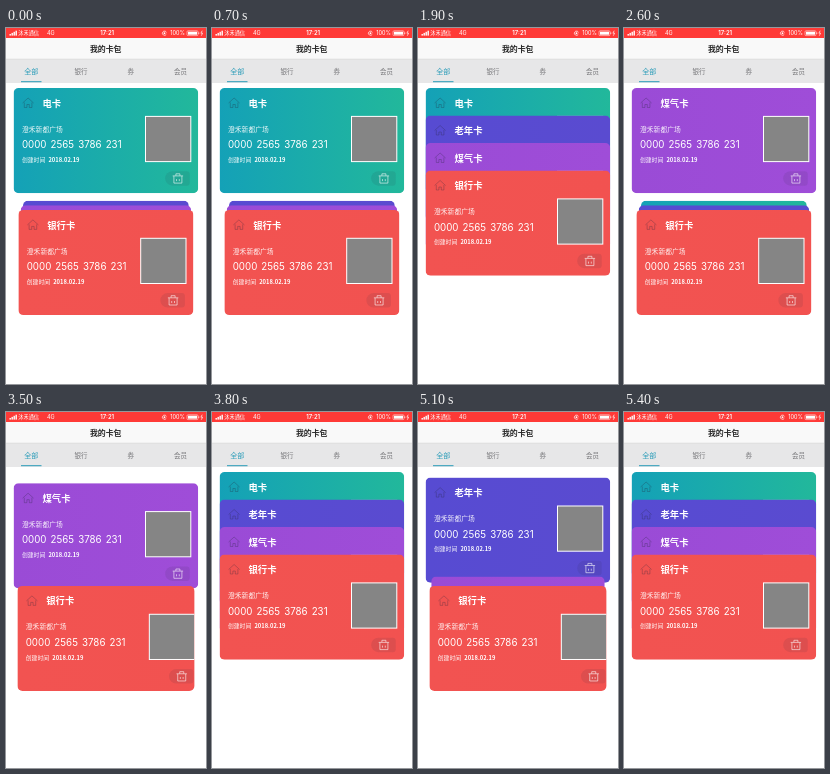
An HTML page with a canvas for the animation above (5.7 s loop, 200 by 356 pixels).

```html
<!DOCTYPE html>
<html lang="zh-CN">
<head>
<meta charset="utf-8">
<title>我的卡包</title>
<style>
html, body { margin: 0; width: 100%; height: 100%; overflow: hidden; background: #fff; }
canvas { display: block; width: 100vw; height: 100vh; }
</style>
</head>
<body>
<canvas id="stage"></canvas>
<script>
const W = 200, H = 356, LOOP = 5700, STEP = 100, DURATION = 400;
const CARD = { x: 7.6, y: 60, w: 184.6, h: 105.2, r: 5 };
const CJK = '"Noto Sans CJK SC", "Noto Sans CJK", sans-serif';
const LATIN = 'Inter, sans-serif';

const cards = [
  { title: '电卡', colors: ['#14a1b7', '#22b89b'] },
  { title: '老年卡', colors: ['#574bd2', '#5a4bd0'] },
  { title: '煤气卡', colors: ['#9a4bd6', '#9f4dd8'] },
  { title: '银行卡', colors: ['#f25351', '#f25250'] }
];

// open: index of the opened card, -1 for the plain list
const moves = [
  { at: 1600, open: -1, lead: 150 },
  { at: 2300, open: 2, lead: 100 },
  { at: 3500, open: -1, lead: 125 },
  { at: 4300, open: 1, lead: 86 },
  { at: 5100, open: -1, lead: 125 }
];

const canvas = document.getElementById('stage');
const ctx = canvas.getContext('2d');
const lerp = (a, b, p) => a + (b - a) * p;

// cubic-bezier(.42, 0, .58, 1)
function ease(x) {
  if (x >= 1) return 1;
  let lo = 0, hi = 1;
  for (let i = 0; i < 24; i++) {
    const u = (lo + hi) / 2, v = 1 - u;
    const bx = 3 * v * v * u * 0.42 + 3 * v * u * u * 0.58 + u * u * u;
    if (bx < x) lo = u; else hi = u;
  }
  return lo * lo * (3 - 2 * lo);
}

function slot(i, open) {
  if (open < 0) return { y: CARD.y + 27.5 * i, inset: 0 };
  if (i === open) return { y: CARD.y, inset: 0 };
  const rank = i > open ? i - 1 : i;
  return { y: 172.7 + 4.6 * rank, inset: 9.4 - 2.3 * rank };
}

function text(str, x, y, size, color, { weight = 400, align = 'left', font = CJK, gap = 0 } = {}) {
  ctx.font = `${weight} ${size}px ${font}`;
  ctx.wordSpacing = `${gap}px`;
  ctx.textAlign = align;
  ctx.textBaseline = 'alphabetic';
  ctx.fillStyle = color;
  ctx.fillText(str, x, y);
}

function rect(x, y, w, h, color) {
  ctx.fillStyle = color;
  ctx.fillRect(x, y, w, h);
}

function round(x, y, w, h, r) {
  ctx.beginPath();
  ctx.roundRect(x, y, w, h, r);
}

function path(points, color, width) {
  ctx.beginPath();
  points.forEach(([x, y], i) => i ? ctx.lineTo(x, y) : ctx.moveTo(x, y));
  ctx.strokeStyle = color;
  ctx.lineWidth = width;
  ctx.stroke();
}

function homeIcon(x, y) {
  const c = 'rgba(40,40,60,.3)';
  path([[x - 5.5, y], [x, y - 5], [x + 5.5, y]], c, 0.9);
  path([[x - 3.8, y - 0.5], [x - 3.8, y + 4.5], [x - 1.2, y + 4.5], [x - 1.2, y + 1.5],
        [x + 1.2, y + 1.5], [x + 1.2, y + 4.5], [x + 3.8, y + 4.5], [x + 3.8, y - 0.5]], c, 0.9);
}

function trashIcon(x, y) {
  const c = 'rgba(255,255,255,.72)';
  path([[x - 5.2, y - 2.6], [x + 5.2, y - 2.6]], c, 0.8);
  path([[x - 2, y - 2.8], [x - 2, y - 4.7], [x + 2, y - 4.7], [x + 2, y - 2.8]], c, 0.8);
  path([[x - 4, y - 2.4], [x - 4, y + 4.6], [x + 4, y + 4.6], [x + 4, y - 2.4]], c, 0.8);
  path([[x - 1.4, y + 0.6], [x - 1.4, y + 2.6]], c, 0.8);
  path([[x + 1.4, y + 0.6], [x + 1.4, y + 2.6]], c, 0.8);
}

function drawCard(card, x, y, clipW, w) {
  ctx.save();
  ctx.translate(x, y);
  round(0, 0, clipW, CARD.h, CARD.r);
  ctx.clip();

  const fill = ctx.createLinearGradient(0, 0, w, 0);
  card.colors.forEach((c, i) => fill.addColorStop(i, c));
  rect(0, 0, w, CARD.h, fill);

  homeIcon(14.5, 15);
  text(card.title, 28.8, 18.6, 9.4, '#fff', { weight: 700 });
  text('澄禾新都广场', 8.4, 43.6, 6.8, 'rgba(255,255,255,.92)', { weight: 500 });
  text('0000 2565 3786 231', 8.3, 60.2, 9.75, '#fff', { font: LATIN, gap: 1.3 });
  text('创建时间', 8.4, 73.7, 5.8, '#fff', { weight: 500 });
  text('2018.02.19', 34.8, 73.7, 5.8, '#fff', { weight: 600, font: CJK });

  // plain tile
  rect(w - 53.2, 27.9, 46.3, 46.2, '#fff');
  rect(w - 52.2, 28.9, 44.3, 44.2, '#858585');

  round(w - 33, 83.2, 24.5, 14.5, [7.2, 3, 3, 7.2]);
  ctx.fillStyle = 'rgba(40,40,60,.1)';
  ctx.fill();
  trashIcon(w - 20.3, 90.5);
  ctx.restore();
}

function drawStatusBar() {
  rect(0, 0, W, 10, '#ff3a37');
  for (let i = 0; i < 4; i++) rect(3.5 + i * 2, 6 - i * 1.1, 1.4, 1.6 + i * 1.1, '#fff');
  text('沐禾通信', 12.3, 7.2, 5.2, '#fff');
  text('4G', 41, 7.2, 5.6, '#fff', { font: LATIN });
  text('17:21', 101.2, 7.3, 5.9, '#fff', { weight: 600, align: 'center', font: LATIN });

  ctx.strokeStyle = '#fff';
  ctx.lineWidth = 0.7;
  ctx.beginPath();
  ctx.arc(158.5, 5.2, 2.1, 0.5, 5.9);
  ctx.stroke();
  rect(157.7, 4.4, 1.6, 1.6, '#fff');

  text('100%', 164.3, 7.2, 5.5, '#fff', { font: LATIN });
  round(181, 2.8, 11, 4.8, 1);
  ctx.lineWidth = 0.5;
  ctx.stroke();
  rect(182, 3.7, 9, 3, '#fff');
  rect(192.5, 4.4, 0.7, 1.6, '#fff');
  path([[196.2, 2.7], [194.9, 5.2], [196.6, 5.2], [195.3, 7.7]], '#fff', 0.7);
}

function drawHeader() {
  drawStatusBar();
  rect(0, 10, W, 21.2, '#f9f9f9');
  text('我的卡包', 99.7, 23.6, 7.9, '#2a2a2a', { weight: 600, align: 'center' });
  rect(0, 31, W, 24, '#e7e7e8');
  rect(0, 30.8, W, 0.5, '#cfcfd1');
  text('全部', 25.3, 45.9, 7.1, '#2a9cb8', { weight: 500, align: 'center' });
  ['银行', '券', '会员'].forEach((label, i) =>
    text(label, 75 + i * 49.7, 46.1, 6.5, '#77777a', { align: 'center' }));
  rect(15, 53.2, 20.5, 1, '#2a9cb8');
}

function draw(t) {
  let from = 0, to = 0, p = 1;
  for (const m of moves) {
    if (t < m.at) break;
    from = to;
    to = m.open;
    p = ease((t - m.at + m.lead) / DURATION);
  }

  rect(0, 0, W, H, '#fff');
  drawHeader();
  cards.forEach((card, i) => {
    const a = slot(i, from), b = slot(i, to);
    const inset = lerp(a.inset, b.inset, p);
    // inner layout snaps to its final width while the outline glides
    drawCard(card, CARD.x + inset, lerp(a.y, b.y, p), CARD.w - 2 * inset, CARD.w - 2 * b.inset);
  });
}

function resize() {
  const dpr = window.devicePixelRatio || 1;
  canvas.width = Math.round(innerWidth * dpr);
  canvas.height = Math.round(innerHeight * dpr);
}

const start = performance.now();
function tick() {
  const t = (performance.now() - start) % LOOP;
  ctx.setTransform(canvas.width / W, 0, 0, canvas.height / H, 0, 0);
  draw(Math.floor(t / STEP) * STEP);
  requestAnimationFrame(tick);
}

addEventListener('resize', resize);
resize();
tick();
</script>
</body>
</html>
```
